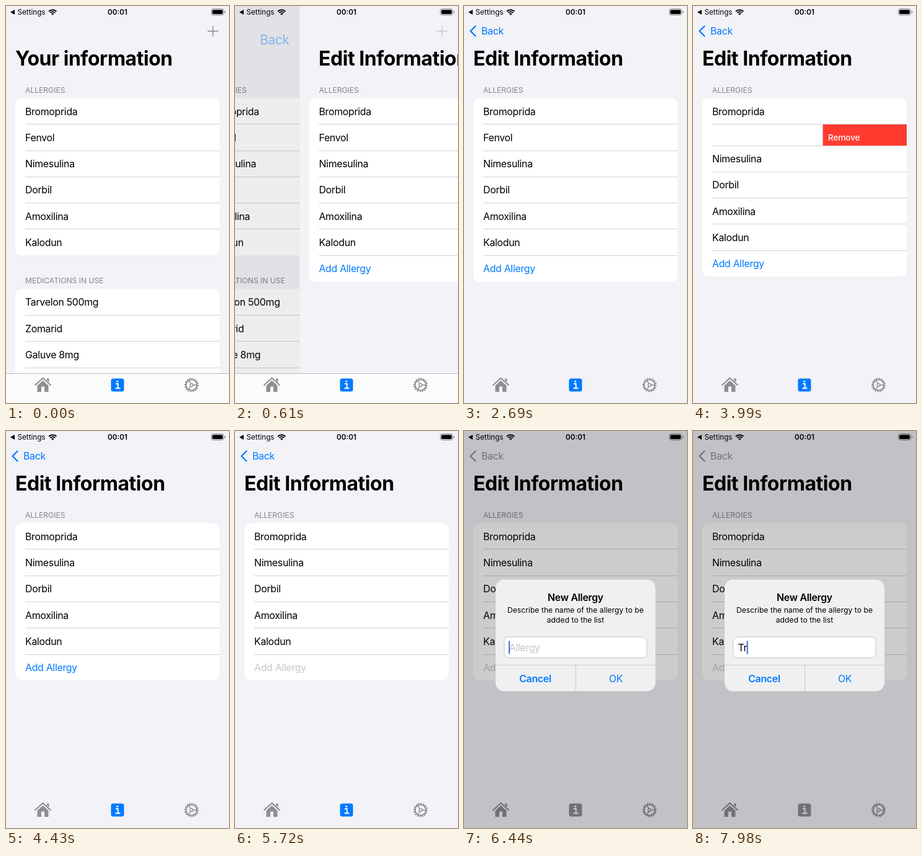
An HTML page that plays this animation: 360x640 px, repeating every 8000 ms.

```html
<!DOCTYPE html>
<html lang="en">
<head>
<meta charset="utf-8">
<title>Allergy list</title>
<style>
html, body { margin: 0; height: 100%; overflow: hidden; background: #f2f2f7; }
svg { display: block; width: 360px; height: 640px; font-family: Inter, Roboto, sans-serif; }
text { white-space: pre; }
.row { font-size: 15.9px; letter-spacing: -.3px; }
.head { font-size: 12.2px; fill: #85858a; letter-spacing: -.05px; }
.title { font-size: 32px; font-weight: 700; letter-spacing: -.47px; }
.rule { stroke: #d2d2d5; stroke-width: 1; }
.blue { fill: #007aff; }
.mid { text-anchor: middle; }
</style>
</head>
<body>
<svg viewBox="0 0 360 640">
  <defs><clipPath id="rowClip"><rect id="rowBox" x="15" y="190.9" width="330" height="42.2"/></clipPath></defs>
  <g id="info"></g>
  <rect id="shade" width="360" height="640" opacity="0"/>
  <g id="edit"></g>

  <text id="infoTitle" class="title" x="15" y="96">Your information</text>
  <text id="editTitle" class="title" y="96">Edit Information</text>
  <path id="plus" d="M325.500 40.500h17M334 32v17" stroke="#85858a" stroke-width="1.400"/>
  <path id="chevron" d="M18.500 32.500l-8 8 8 8" fill="none" stroke-width="2.300" stroke-linecap="round" stroke-linejoin="round"/>
  <text id="back" class="row">Back</text>

  <g id="bar"><rect y="592" width="360" height="48" fill="#fbfbfc"/><path d="M0 592.500H360" stroke="#bcbcbf"/></g>
  <g fill="#8e8e93" stroke="#8e8e93">
    <path d="M47.200 611L59.500 599.800 71.800 611" fill="none" stroke-width="2.200" stroke-linecap="round" stroke-linejoin="round"/>
    <path d="M50.500 612l9-8.200 9 8.200v10H62v-8.500h-5v8.500h-6.500zM66 600.500h3.500v6l-3.500-3.200z" stroke="none"/>
    <g fill="none">
      <circle cx="299.500" cy="611" r="8.800" stroke-width="2"/>
      <circle cx="299.500" cy="611" r="10.600" stroke-width="2" pathLength="32" stroke-dasharray="1"/>
      <circle cx="299.500" cy="611" r="2.400" stroke-width="1.400"/>
      <path d="M302 611h6.500M298.300 608.800l-3.200-5.600M298.300 613.200l-3.200 5.600" stroke-width="1.500"/>
    </g>
  </g>
  <rect id="tab" x="169.500" y="600.500" width="21" height="21" rx="3.500"/>
  <path d="M177 609h3.700v7M176.500 616.300h8" fill="none" stroke="#fff" stroke-width="1.900"/>
  <circle cx="179.800" cy="605.300" r="1.500" fill="#fff"/>

  <path d="M14 6v8l-7-4z"/>
  <text x="18.500" y="14.200" font-size="11.700">Settings</text>
  <path d="M69 8.700a9 9 0 0 1 12.500 0M71.300 11a6 6 0 0 1 8 0" fill="none" stroke="#000" stroke-width="2"/>
  <path d="M75.300 15l-2.200-2.500a3.500 3.500 0 0 1 4.400 0z"/>
  <text class="mid" x="180" y="14.200" font-size="11.700" font-weight="600">00:01</text>
  <rect x="331.500" y="4.700" width="20" height="9.800" rx="2.800" fill="none" stroke="#77777a"/>
  <rect x="333" y="6.200" width="17" height="6.800" rx="1.600"/>
  <path d="M353 8v3.400q1.500-.5 1.500-1.700T353 8z" fill="#77777a"/>

  <rect id="dim" width="360" height="640"/>
  <g id="alert">
    <rect x="51" y="239.500" width="258" height="180" rx="13.400" fill="#f0f0f1"/>
    <text class="mid" x="180" y="274" font-size="15.900" font-weight="600" letter-spacing="-.3">New Allergy</text>
    <g class="mid" font-size="12.200">
      <text x="180" y="293.300">Describe the name of the allergy to be</text>
      <text x="180" y="308.600">added to the list</text>
    </g>
    <rect x="65" y="332" width="230" height="33.500" rx="7" fill="#fff" stroke="#c6c6c9"/>
    <text id="field" class="row" x="72.500" y="354.700"></text>
    <rect id="caret" y="338.500" width="2" height="21" fill="#3f6ce0"/>
    <path d="M51 377.500H309M180.500 377.500V419.500" stroke="#c8c8cb"/>
    <g class="row blue mid"><text x="115" y="404.500" font-weight="600">Cancel</text><text x="245" y="404.500">OK</text></g>
  </g>
</svg>
<script>
const $ = id => document.getElementById(id);
const set = (id, attrs) => { for (const k in attrs) $(id).setAttribute(k, attrs[k]); };
const clamp = x => Math.min(1, Math.max(0, x));
const smooth = x => (x = clamp(x), x * x * (3 - 2 * x));
const mix = (a, b, k) => `rgb(${a.map((v, i) => Math.round(v + (b[i] - v) * k))})`;
const BLUE = [0, 122, 255], GRAY = [142, 142, 147];
const ROW = 42.24, TOP = 148.6;

const label = (s, y, attrs = '') => `<text class="row" x="31" y="${y + 27}" ${attrs}>${s}</text>`;
const rule = (y, attrs = '') => `<path class="rule" d="M31 ${Math.floor(y) + .5}H345" ${attrs}/>`;
const card = (y, n, id = '') => `<rect ${id} x="15" y="${y}" width="330" height="${n * ROW}" rx="9.600" fill="#fff"/>`;
const head = (s, y) => `<text class="head" x="31" y="${y}">${s}</text>`;
const page = '<rect width="360" height="640" fill="#f2f2f7"/>' + head('ALLERGIES', 139.5);
const rows = (names, y) => names.map((s, i) => label(s, y + i * ROW) + rule(y + (i + 1) * ROW)).join('');

const allergies = ['Bromoprida', 'Fenvol', 'Nimesulina', 'Dorbil', 'Amoxilina', 'Kalodun'];
$('info').innerHTML = page + card(TOP, 6) + rows(allergies.slice(0, 5), TOP) + label(allergies[5], TOP + 5 * ROW) +
  head('MEDICATIONS IN USE', 447) + card(456.3, 6) + rows(['Tarvelon 500mg', 'Zomarid', 'Galuve 8mg'], 456.3);
$('edit').innerHTML = page + card(TOP, 7, 'id="card"') + rows(allergies.slice(0, 1), TOP) +
  `<g clip-path="url(#rowClip)">${label(allergies[1], TOP + ROW, 'id="swiped"')}
   <rect id="red" y="190.500" height="43" fill="#ff3b30"/>
   <text id="remove" y="217" font-size="13.400" font-weight="500" fill="#fff">Remove</text></g>
   <g id="rest">${rule(TOP + 2 * ROW, 'id="seam"')}${rows(allergies.slice(2), TOP + 2 * ROW)}
   ${label('Add Allergy', TOP + 6 * ROW, 'id="add"')}</g>`;

// Motion advances in beats of about 109 ms, counted from the start of each action.
const BEAT = 108.6, STARTS = [5720, 2690, 500];
const beat = t => {
  const start = STARTS.find(s => t >= s);
  return start ? start + Math.floor((t - start + 12) / BEAT) * BEAT : 0;
};
const CARET = [[7870, 1], [7330, 0], [7200, .5], [7010, 1], [6850, .5], [6680, 0], [6560, .5], [0, 1]];

function draw(t) {
  const b = beat(t);

  // Page push
  const w = Math.max(0, b - 431) * .014;
  const p = t < 500 ? 0 : t >= 1180 ? 1 : 1 - (1 + w) * Math.exp(-w), q = 1 - p;
  set('info', { transform: `translate(${-108 * p})` });
  set('shade', { opacity: p < 1 ? .1 * p : 0 });
  set('edit', { transform: `translate(${360 * q})` });
  set('infoTitle', { x: 15 - 108 * p, opacity: clamp(1 - 2 * p) });
  set('editTitle', { x: 15 + 414 * q });
  set('plus', { opacity: 1 - p ** 1.5 });
  set('bar', { opacity: clamp((930 - b) / 110) });

  // Alert
  const a = smooth((b - 5740) / 414), tint = mix(BLUE, GRAY, a);
  set('back', { transform: `translate(${28 + 42 * q} ${46 + 56 * q}) scale(${1 + 1.07 * q})`, opacity: clamp((p - .52) / .46), fill: tint });
  set('chevron', { stroke: tint, opacity: clamp((p - .8) / .2) });
  set('tab', { fill: tint });
  set('dim', { opacity: .2 * a });
  const z = 1.18 - .18 * a;
  set('alert', { opacity: a, transform: `translate(180 329.500) scale(${z}) translate(-180 -329.500)` });

  // Swipe and removal
  const open = 71 * smooth((b - 2720) / 780) + 259 * smooth((b - 3850) / 440);
  const gone = smooth((b - 3870) / 440), left = 345 - open;
  set('swiped', { x: 31 - open });
  set('red', { x: left, width: open });
  set('remove', { x: left + 8.5 });
  set('rowBox', { height: ROW * (1 - gone) });
  set('rest', { transform: `translate(0 ${-Math.round(ROW * gone)})` });
  set('seam', { opacity: gone < 1 ? 1 : 0 });
  set('card', { height: ROW * (7 - gone) });
  set('add', { fill: t < 5720 ? '#007aff' : '#c8c8cb' });

  // Typing
  const typed = t < 7870 ? '' : t < 7980 ? 'T' : 'Tr', field = $('field');
  field.textContent = typed || 'Allergy';
  field.setAttribute('fill', typed ? '#000' : '#c4c4c7');
  set('caret', { x: typed ? 72 + field.getComputedTextLength() : 72, opacity: CARET.find(k => t >= k[0])[1] });
}

const begin = performance.now();
(function tick() {
  draw((performance.now() - begin) % 8000);
  requestAnimationFrame(tick);
})();
</script>
</body>
</html>
```
